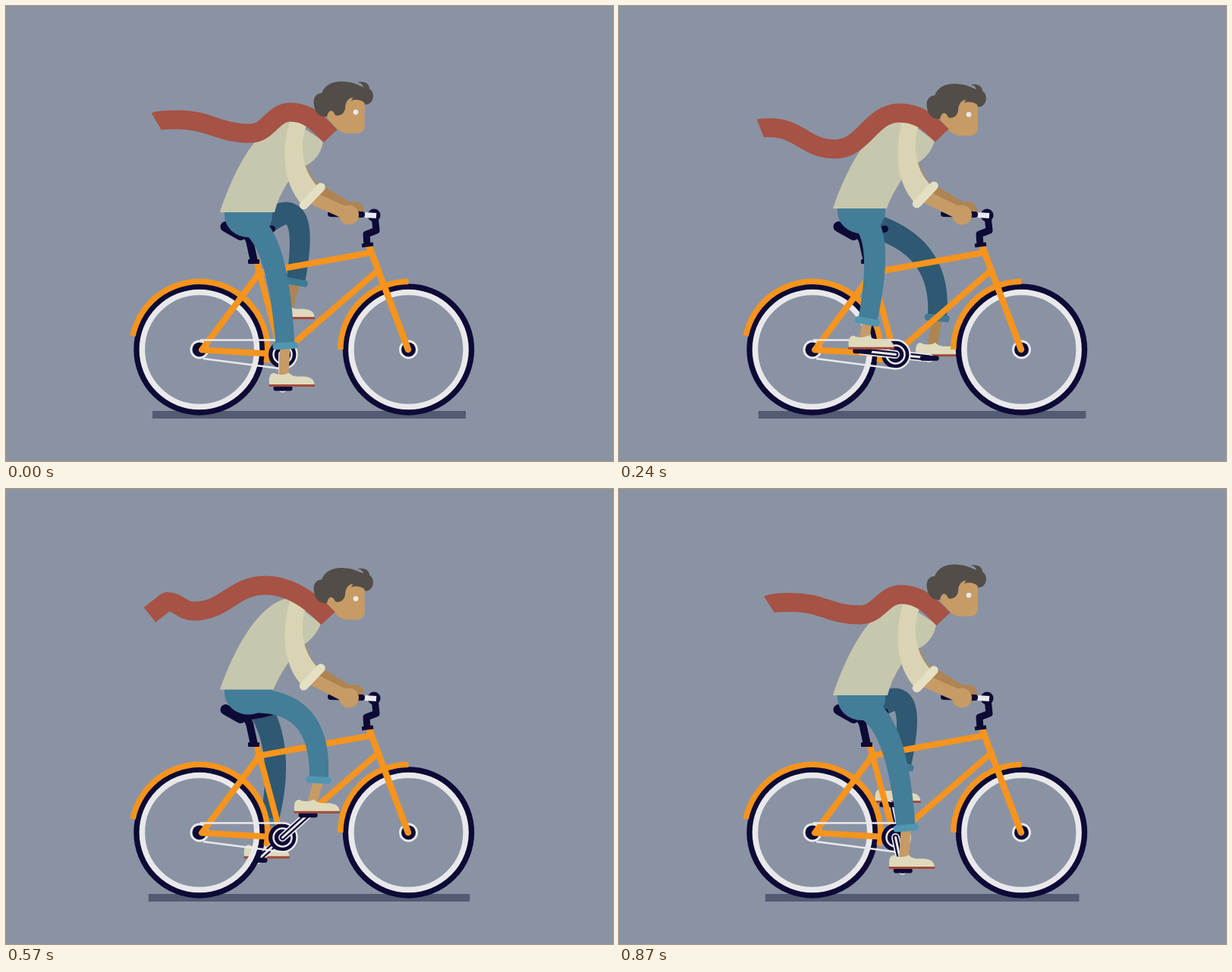
An HTML page with a canvas that plays this animation: 800 by 600 pixels, repeating every 0.9 s.

```html
<!DOCTYPE html>
<html lang="en">
<head>
<meta charset="utf-8">
<title>Cyclist</title>
<style>
html, body { margin: 0; width: 100%; height: 100%; overflow: hidden; background: #8a93a4; }
canvas { display: block; }
</style>
</head>
<body>
<canvas id="stage" width="800" height="600"></canvas>
<script>
const g = document.getElementById('stage').getContext('2d');
const LOOP = 900, STEP = 30, TAU = Math.PI * 2;
const C = {
  sky: '#8a93a4', ground: '#535b72', navy: '#0d0a36', white: '#e9e9eb', orange: '#f7941d',
  skin: '#c69b66', farSleeve: '#a38d79', farHand: '#ae8452', hair: '#524d48', scarf: '#a65244',
  shirt: '#c7c7ae', sleeve: '#d9d5b4', cuff: '#e4e0c3', shoe: '#dfdabc', sole: '#a24a3a',
  jeans: '#437d98', hem: '#5096b1', farJeans: '#2f5872', farHem: '#3f7a95'
};

// Poses at these times, blended by a periodic spline.
const TIMES = [0, 150, 330, 450, 570, 690];
// Ankle relative to pedal, then the bend point of the leg.
const NEAR = [
  [3.5, -56, 359, 309], [3.5, -45, 341, 319], [11.5, -35, 364, 293],
  [15.5, -41, 391, 269], [14.5, -46, 418, 277], [12, -50, 424, 292]
];
const FAR = [
  [17, -51, 405, 230], [9.5, -54, 424, 264], [12.5, -51, 425, 366],
  [12, -50, 395, 352], [15, -51, 369, 345], [12, -49, 350, 340]
];
// Tail, crest, trough, crest.
const SCARF = [
  [198, 152, 226, 150, 322, 168, 375, 140],
  [192, 158.5, 208, 157, 298, 183, 373, 141],
  [181.5, 163, 194, 162.5, 272, 190.5, 365, 139.5],
  [184.5, 163, 205, 160, 258, 177.5, 353, 132],
  [189.5, 166, 212, 148.5, 247, 161, 342, 127],
  [192.5, 159.5, 222, 148.5, 267, 158.5, 347, 130]
];

function pose(keys, t) {
  const n = TIMES.length;
  const time = i => TIMES[(i + n) % n] + LOOP * Math.floor(i / n);
  const key = i => keys[(i + n) % n];
  let i = n - 1;
  while (TIMES[i] > t) i--;
  const span = time(i + 1) - time(i), u = (t - time(i)) / span;
  return key(i).map((a, k) => {
    const b = key(i + 1)[k];
    const va = (b - key(i - 1)[k]) / (time(i + 1) - time(i - 1)) * span;
    const vb = (key(i + 2)[k] - a) / (time(i + 2) - time(i)) * span;
    const c = 3 * (b - a) - 2 * va - vb, d = 2 * (a - b) + va + vb;
    return a + u * (va + u * (c + u * d));
  });
}

function fill(color, d) {
  g.fillStyle = color;
  g.fill(new Path2D(d));
}
function line(color, width, d, cap = 'butt') {
  g.strokeStyle = color;
  g.lineWidth = width;
  g.lineCap = cap;
  g.lineJoin = 'round';
  g.stroke(new Path2D(d));
}
function disc(color, x, y, r) {
  g.fillStyle = color;
  g.beginPath();
  g.arc(x, y, r, 0, TAU);
  g.fill();
}
function ring(color, width, x, y, r, from = 0, to = 360) {
  g.strokeStyle = color;
  g.lineWidth = width;
  g.lineCap = 'butt';
  g.beginPath();
  g.arc(x, y, r, from * TAU / 360, to * TAU / 360);
  g.stroke();
}
function box(color, x, y, w, h, r) {
  g.fillStyle = color;
  g.beginPath();
  g.roundRect(x, y, w, h, r);
  g.fill();
}
function at(x, y, angle, draw) {
  g.save();
  g.translate(x, y);
  g.rotate(angle);
  draw();
  g.restore();
}

const HUB = { x: 364.5, y: 459.5 };

function pedalAt(phase) {
  return [HUB.x - 44.5 * Math.sin(phase), HUB.y + 44.5 * Math.cos(phase)];
}

function crank([px, py]) {
  const d = `M${HUB.x} ${HUB.y}L${px} ${py}`;
  line(C.white, 11, d, 'round');
  line(C.navy, 7.5, d, 'round');
  line(C.white, 3, d, 'round');
  box(C.navy, px - 12, py - 3, 25, 6.5, 3);
}

// Tapered hose along a quadratic curve.
function hose(color, hx, hy, cx, cy, ax, ay) {
  const left = [], right = [];
  for (let i = 0; i <= 24; i++) {
    const t = i / 24, s = 1 - t, r = (32 - 7 * t) / 2;
    const x = s * s * hx + 2 * s * t * cx + t * t * ax;
    const y = s * s * hy + 2 * s * t * cy + t * t * ay;
    const dx = s * (cx - hx) + t * (ax - cx), dy = s * (cy - hy) + t * (ay - cy);
    const k = r / Math.hypot(dx, dy);
    left.push(`${x - dy * k} ${y + dx * k}`);
    right.unshift(`${x + dy * k} ${y - dx * k}`);
  }
  fill(color, 'M' + left.concat(right).join('L') + 'Z');
}

function leg([px, py], [dx, dy, cx, cy], hx, hy, jeans, hem, skin) {
  const ax = px + dx, ay = py + dy;
  line(skin, 13, `M${ax} ${ay}L${px + dx * 0.4} ${py - 15}`);
  at(px, py, 0, () => {
    fill(C.shoe, 'M-17 -4C-19 -12 -17 -21 -11 -20C-5 -17 3 -17 8 -20.5C13 -15 19 -15.5 27 -15.5C37 -15 42 -12 42 -4Z');
    box(C.sole, -18, -5, 60.5, 3, 0);
  });
  hose(jeans, hx, hy, cx, cy, ax, ay);
  at(ax, ay, Math.atan2(ay - cy, ax - cx) - Math.PI / 2, () => box(hem, -16.5, -4.5, 33, 9, 4));
}

function bike() {
  for (const x of [255, 530.5]) {
    ring(C.navy, 8, x, 453, 82.7);
    ring(C.white, 7.5, x, 453, 75.6);
    disc(C.white, x, 453, 12.5);
    disc(C.navy, x, 453, 9.5);
  }
  ring(C.orange, 7.5, 255, 453, 89.7, 191.5, 371);
  ring(C.orange, 7.5, 530.5, 453, 89.7, 180, 270);
  line(C.orange, 8, 'M334 352L258 453.5L364 459.5M330 336L363 459M332 352L482 325M491 348L364 458', 'round');
  line(C.orange, 8.5, 'M478 315L530 453', 'round');

  line(C.navy, 14, 'M289.5 291L309 302', 'round');
  line(C.navy, 9, 'M309 301Q328 300 350.5 294', 'round');
  line(C.navy, 10, 'M312 300Q321 304 322 314L327 337');
  box(C.navy, 319, 334, 15, 6, 1);

  disc(C.navy, HUB.x, HUB.y, 18.5);
  line(C.white, 2.4, 'M256 440.5L364.5 440.5A19 19 0 0 1 364.5 478.5L260 465');
  ring(C.white, 2.5, HUB.x, HUB.y, 12);
}

function handlebar() {
  line(C.navy, 9, 'M486 277L488 296L475 301L476 316');
  line(C.navy, 5, 'M469 316L484 314');
  disc(C.navy, 485, 276, 8.5);
  line(C.navy, 8, 'M428 274L469 275', 'round');
  line(C.white, 7, 'M473 275.5L488 276.5');
}

function scarf(p, lift) {
  const [tx, ty, ax, ay, bx, by, cx, cy] = p;
  const ex = 427.5 - 3.5 * lift, ey = 171.5 - lift;
  const wave = (x0, y0, x1, y1) => {
    const k = (x1 - x0) * 0.45;
    return `C${x0 + k} ${y0} ${x1 - k} ${y1} ${x1} ${y1}`;
  };
  line(C.scarf, 25, `M${tx} ${ty}Q${tx + 1 + 1.2 * (ty - ay)} ${ay} ${ax} ${ay}`
    + wave(ax, ay, bx, by) + wave(bx, by, cx, cy)
    + `C${cx + (ex - cx) * 0.42} ${cy} ${ex - 18} ${ey - 19} ${ex} ${ey}`);
}

function rider(t, hip, lift) {
  const arm = -3.3 * lift, back = -5 * lift, nod = 5.5 * lift;

  line(C.skin, 16.5, `M403 ${253 + arm}L448 273`);
  disc(C.skin, 452, 275.5, 13);

  fill(C.shirt, `M282 ${hip}C293 ${238 + back} 324 ${158 + back} 372 ${148 + back}L${418 - 4 * lift} 178`
    + `C${416 - 6 * lift} ${196 - 9 * lift} ${402 - 2 * lift} ${210 - 9 * lift} 389 ${212 - 6 * lift}`
    + `L373 ${230 + arm}Q358 ${253 + arm} ${354 - 2 * lift} ${hip}Z`);
  fill(C.sleeve, `M375 ${148 + back}C362 190 365 ${235 + arm} 391 ${263 + arm}L414 ${241 + arm}`
    + `C392 ${222 + arm} 384 185 397 ${155 + back}Z`);
  line(C.cuff, 11.5, `M392.5 ${262.5 + arm}L415 ${239 + arm}`, 'round');

  at(0, nod, 0, () => fill(C.skin,
    'M424 138Q422 148 427 152L437 163Q443 168 452 168L463 168Q473 167 473 157L473 122L440 115Z'));
  scarf(pose(SCARF, t), lift);
  at(0, nod, 0, () => {
    fill(C.hair, 'M406 131C404 121 409 115 416 115C421 102 434 98 448 100C457 100 464 104 471 107'
      + 'C470 103 467 101 462 101C473 98 479 103 479 109C488 115 484 131 473 130'
      + 'C472 124 464 120 459 120C450 121 447 128 447 135C446 142 440 146 434 144'
      + 'C431 136 425 136 423 146C414 147 407 141 406 131Z');
    fill(C.hair, 'M455 125Q463 121 474 128L470 119L458 119Z');
    disc(C.white, 461, 140, 3.4);
  });
}

function draw(t) {
  const phase = t / LOOP * TAU;
  const lift = (1 - Math.cos(phase)) / 2, hip = 272 - 9 * lift;
  const near = pedalAt(phase), far = pedalAt(phase + Math.PI);
  const half = 211.2 - 4.7 * Math.cos(2 * phase);

  g.fillStyle = C.sky;
  g.fillRect(0, 0, 800, 600);
  box(C.ground, 399.5 - half, 534, half * 2, 10, 0);

  leg(far, pose(FAR, t), 333, hip + 22, C.farJeans, C.farHem, C.farHand);
  crank(far);
  line(C.farHand, 13, 'M404 236L455 267');
  line(C.farSleeve, 13, 'M388 198Q394 228 408 240');
  disc(C.farHand, 460, 270, 12);
  bike();
  crank(near);
  leg(near, pose(NEAR, t), 322, hip + 15, C.jeans, C.hem, C.skin);
  fill(C.jeans, `M288 ${hip - 1}H351V${hip + 4}A31.5 29 0 0 1 288 ${hip + 4}Z`);
  handlebar();
  rider(t, hip, lift);
}

function tick(now) {
  draw(Math.floor(now % LOOP / STEP) * STEP);
  requestAnimationFrame(tick);
}
draw(0);
requestAnimationFrame(tick);
</script>
</body>
</html>
```
